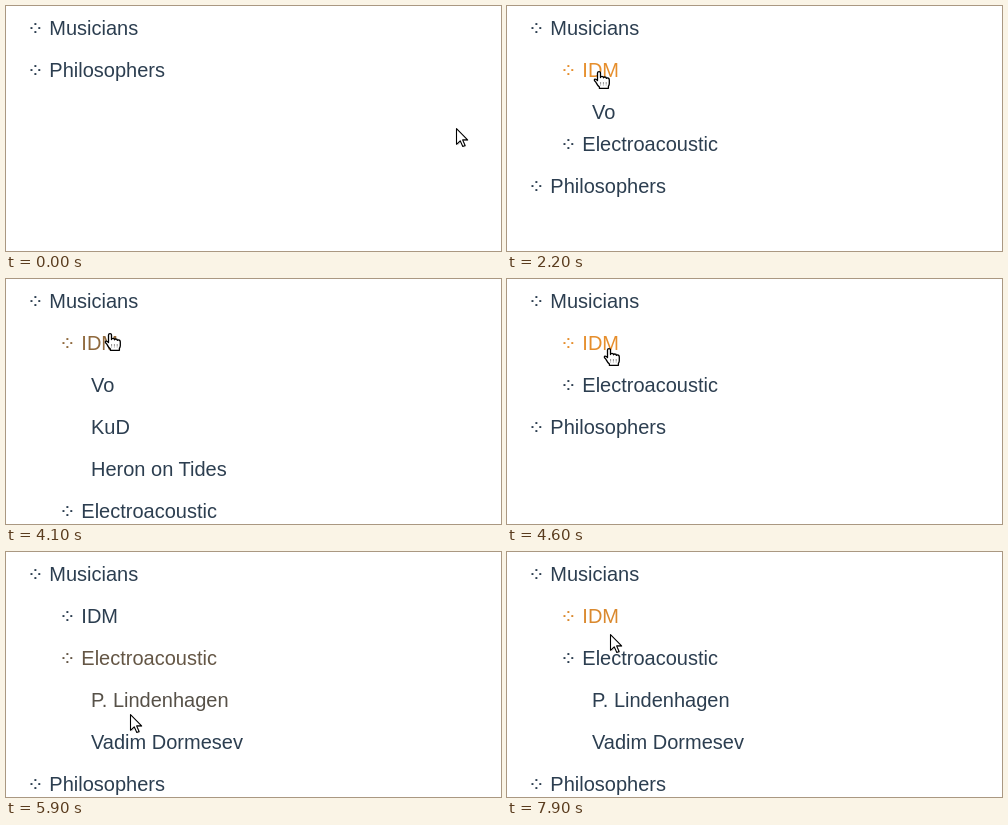
These frames come from a looping animation (495 px wide and 245 px high, 8 s). An HTML page:

```html
<!DOCTYPE html>
<html lang="en">
<head>
<meta charset="utf-8">
<title>Tree menu</title>
<style>
  html, body { margin: 0; width: 100%; height: 100%; overflow: hidden; background: #fff; }
  body { position: relative; font: 20px/42px "Liberation Sans", Arial, sans-serif; color: #2c3e50; }
  ul { margin: 0; padding: 0; list-style: none; }
  li ul { padding-left: 32px; overflow: hidden; }
  #tree { position: absolute; left: 21px; top: 1px; width: 440px; }
  .label { height: 42px; white-space: nowrap; }
  .bullet { font-family: "DejaVu Sans", sans-serif; line-height: 0; }
  #cursor { position: absolute; left: 0; top: 0; width: 1px; height: 1px; overflow: visible; }
  #cursor path { stroke: #000; stroke-linejoin: round; stroke-linecap: round; }
</style>
</head>
<body>
<ul id="tree"></ul>
<svg id="cursor">
  <g id="arrow">
    <path d="M1.5 2V17.5L5.3 13.9L7.8 19.4L10.2 18.4L7.8 12.9H12.6Z" style="fill:#000;stroke:none;opacity:.2"/>
    <path d="M.5 .6V16.3L4.2 12.8L6.8 18.5L9.1 17.5L6.6 11.9H11.6Z" fill="#fff" stroke-width="1.1"/>
  </g>
  <g id="hand">
    <path d="M-1.5 2Q-1.5 .6 0 .6Q1.5 .6 1.5 2V6.5Q1.7 5.4 3 5.4Q4.4 5.4 4.5 6.8Q5 5.9 6 6Q7.3 6.1 7.4 7.4
      Q8 6.8 8.9 7Q10.3 7.3 10.3 8.8V12.5Q10.3 14 9.4 15.3V17.3H.4V16Q-1.6 14.2-2.6 12.1Q-3.3 10.8-4.2 10
      Q-5.1 8.9-4.2 8.2Q-3.2 7.7-1.5 9.6Z" fill="#fff" stroke-width="1.3"/>
    <path d="M1.6 11.5V14M4.4 11.5V14M7.2 11.5V14" fill="none" stroke-width=".8" stroke-dasharray="1 1.4" opacity=".6"/>
  </g>
</svg>
<script>
const LOOP = 8000, TICK = 100, STEP = 10, FADE = 300;
const ROW = 42, INDENT = 32, LEFT = 21, TOP = 1, REACH = 11.5;
const BASE = [44, 62, 80], HOT = [230, 142, 44];

// Each click toggles a branch: when, and how long it takes
const TREE = [
  { text: 'Musicians', clicks: [{ at: 1305, takes: 150 }], kids: [
    { text: 'IDM', clicks: [{ at: 2175, takes: 267 }, { at: 4280, takes: 220 }], kids: [
      { text: 'Vo' }, { text: 'KuD' }, { text: 'Heron on Tides' }
    ] },
    { text: 'Electroacoustic', clicks: [{ at: 5160, takes: 170 }], kids: [
      { text: 'P. Lindenhagen' }, { text: 'Vadim Dormesev' }
    ] }
  ] },
  { text: 'Philosophers', clicks: [], kids: [] }
];

// Pointer moves: from, until, x, y
const HOME = [450, 122];
const MOVES = [
  [30, 400, 291, 121],
  [540, 1160, 96, 22],
  [1620, 1960, 93, 58],
  [2100, 2200, 92, 65],
  [2400, 3400, 109, 188],
  [3500, 4100, 104, 54],
  [4200, 4600, 102, 69],
  [4600, 5000, 111, 100],
  [5580, 5900, 124, 162],
  [5900, 6400, 111, 147],
  [6500, 6900, 117, 182],
  [7100, 7700, 87, 58],
  [7850, 7900, 103, 82]
];

const items = [];
const root = document.getElementById('tree');
const cursor = document.getElementById('cursor');
const arrow = document.getElementById('arrow');
const hand = document.getElementById('hand');

const clamp = v => Math.min(1, Math.max(0, v));
const smooth = p => p * p * (3 - 2 * p);
const easeOut = p => 1 - (1 - p) ** 3;
const mix = (a, b, p) => a + (b - a) * p;

function build(nodes, list) {
  for (const node of nodes) {
    const li = document.createElement('li');
    const bullet = node.kids ? '<span class="bullet">⁘</span> ' : '';
    li.innerHTML = `<div class="label"><span>${bullet}${node.text}</span></div>`;
    node.label = li.firstChild;
    items.push(node);
    list.append(li);
    node.width = node.label.firstChild.offsetWidth;
    if (node.kids) {
      node.list = document.createElement('ul');
      build(node.kids, node.list);
      li.append(node.list);
    }
  }
}

function openness(node, t) {
  return node.clicks.reduce((open, { at, takes }, i) =>
    mix(open, 1 - i % 2, easeOut(clamp((t - at) / takes))), 0);
}

function listHeight(node, t) {
  if (!node.kids) return 0;
  const full = node.kids.reduce((sum, kid) => sum + ROW + listHeight(kid, t), 0);
  return full * openness(node, t);
}

function pointer(t) {
  return MOVES.reduce(([px, py], [from, until, x, y]) => {
    const p = smooth(clamp((t - from) / (until - from)));
    return [mix(px, x, p), mix(py, y, p)];
  }, HOME);
}

// The item whose text lies under the pointer, if any
function hit(nodes, t, [x, y], left = LEFT, top = TOP, bottom = Infinity) {
  for (const node of nodes) {
    const over = Math.abs(y - top - ROW / 2) < REACH && x >= left && x < left + node.width;
    if (over && y < bottom) return node;
    top += ROW;
    if (!node.kids) continue;
    const end = top + listHeight(node, t);
    const found = hit(node.kids, t, [x, y], left + INDENT, top, Math.min(bottom, end));
    if (found) return found;
    top = end;
  }
  return null;
}

// Follow the hover fades through one loop and keep a state per tick
function record() {
  const states = [];
  const levels = items.map(() => 0);
  for (let t = 0; t < LOOP; t += STEP) {
    const over = hit(TREE, t, pointer(t));
    items.forEach((node, i) => {
      levels[i] = clamp(levels[i] + (node === over ? STEP : -STEP) / FADE);
    });
    if (t % TICK === 0) states.push({ levels: [...levels], pointing: over !== null });
  }
  return states;
}

function draw(tick) {
  const t = tick * TICK;
  const { levels, pointing } = states[tick];
  items.forEach((node, i) => {
    node.label.style.color = `rgb(${BASE.map((c, k) => Math.round(mix(c, HOT[k], levels[i])))})`;
    if (node.list) node.list.style.height = Math.round(listHeight(node, t)) + 'px';
  });
  const [x, y] = pointer(t).map(Math.round);
  cursor.style.transform = `translate(${x}px, ${y}px)`;
  arrow.style.display = pointing ? 'none' : '';
  hand.style.display = pointing ? '' : 'none';
}

build(TREE, root);
// Nested lists join the page only after their rows exist, so measure once more
for (const node of items) node.width = node.label.firstChild.offsetWidth;
const states = record();

const start = performance.now();
function frame() {
  draw(Math.floor((performance.now() - start) % LOOP / TICK));
  requestAnimationFrame(frame);
}
draw(0);
requestAnimationFrame(frame);
</script>
</body>
</html>
```
